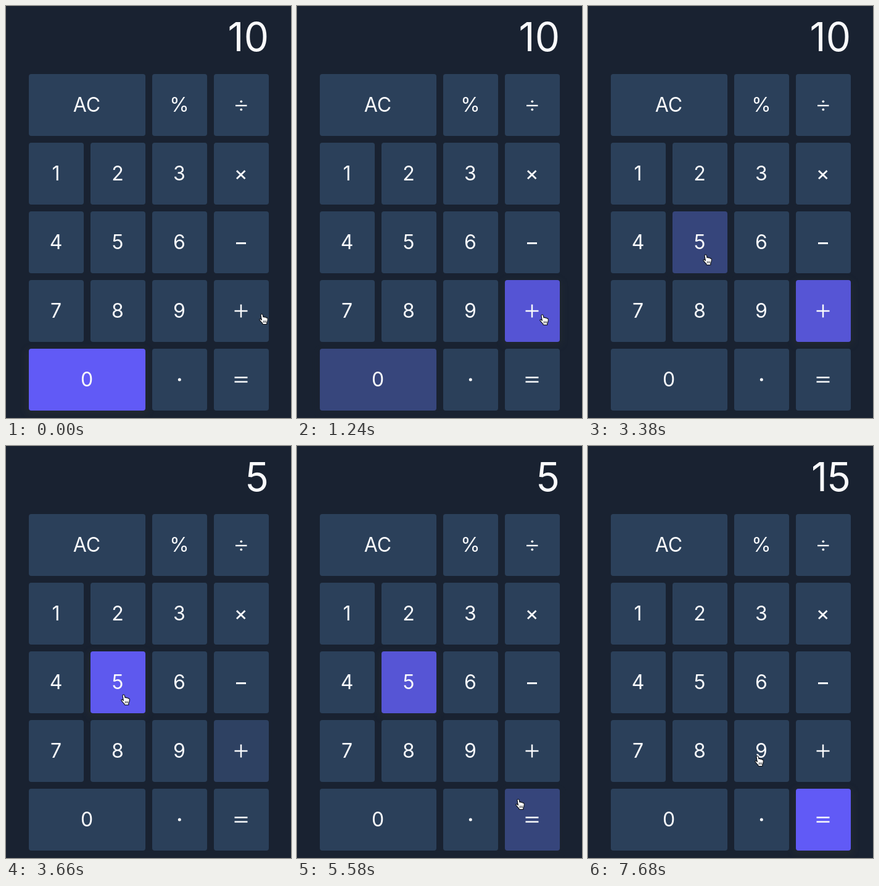
An HTML page for the animation above (8000 ms loop, 462 by 666 pixels).

```html
<!DOCTYPE html>
<html lang="en">
<head>
<meta charset="utf-8">
<title>Calculator</title>
<style>
  html, body { margin: 0; width: 100%; height: 100%; overflow: hidden; background: #192231; }
  svg { display: block; width: 100%; height: 100%; }
  text { font-family: Inter, Roboto, sans-serif; fill: #f9fafc; }
  .label { font-size: 32px; text-anchor: middle; }
  .display { font-size: 64px; text-anchor: end; }
  .sign { fill: none; stroke: #f9fafc; }
</style>
</head>
<body>
<svg viewBox="0 0 462 666">
  <defs><filter id="blur" x="-30%" y="-30%" width="160%" height="160%"><feGaussianBlur stdDeviation="6"/></filter></defs>
  <rect width="462" height="666" fill="#192231"/>
  <text class="display" id="display" x="426" y="73"></text>
  <g id="glows"></g>
  <g id="keys"></g>
  <g id="cursor">
    <path id="arrow" d="M.5 .5V14.8L3.7 11.8L6 17.2L8.2 16.2L6 11H10Z" fill="#080a0e" stroke="#fff" stroke-width="1.1"/>
    <g id="hand" stroke="#0b0e14" stroke-linejoin="round">
      <path d="M-2 1.6C-2-.3.8-.5 1.2 1.3L2 5C2.6 4 4.4 4.2 4.6 5.4C5.4 4.6 7 5 7.1 6.2C8.2 5.6 9.4 6.4 9.3 8C9.3 11 8.6 12.6 7.8 14V16.5H1.2L.9 15C-.5 13.5-2.5 11.5-3.8 9.6C-4.6 8.2-3 7.4-1.8 8.4L-.6 9.6Z" fill="#fff" stroke-width="1.1"/>
      <path d="M2.4 10.5v3.5M4.4 10.5v3.5M6.4 10.5v3.5" stroke-width=".8"/>
    </g>
  </g>
</svg>
<script>
const LOOP = 8000, FADE = 500;
const IDLE = [43, 64, 90], ACTIVE = [97, 90, 246];
const $ = id => document.getElementById(id);

function add(parent, tag, attrs, text = '') {
  const el = document.createElementNS('http://www.w3.org/2000/svg', tag);
  for (const name in attrs) el.setAttribute(name, attrs[name]);
  el.textContent = text;
  parent.append(el);
  return el;
}

// Operator strokes, relative to the key centre: [path, width]
const signs = {
  '÷': ['M-9 1H9.5', 2.4],
  '×': ['M-6.7-5.2L6-.2M-6.7-5.2', 0],
  '−': ['M-8 1.5H8', 3],
  '+': ['M-10.5 0H10.5M0-10.5V10.5', 2.5],
  '=': ['M-10.5-3.5H10.5M-10.5 3.5H10.5', 2.4]
};
signs['×'] = ['M-7-4.7L6.5 8.3M6.5-4.7L-7 8.3', 2.9];
const dots = { '÷': [-5.7, 7.4], '·': [0] };

// Rows of keys; null widens the key before it
const rows = [['AC', null, '%', '÷'], ['1', '2', '3', '×'], ['4', '5', '6', '−'],
  ['7', '8', '9', '+'], ['0', null, '·', '=']];
const keys = [];
rows.forEach((row, r) => row.forEach((name, c) => {
  if (!name) return;
  const x = 37 + 100 * c, y = 110 + 111 * r;
  const w = row[c + 1] === null ? 189 : 89, h = 100;
  const glow = add($('glows'), 'rect', { x: x - 3, y: y + 1, width: w + 6, height: h + 5, rx: 6,
    fill: '#30352f', filter: 'url(#blur)' });
  const box = add($('keys'), 'rect', { x, y, width: w, height: h, rx: 4 });
  const cx = x + w / 2 - .5, cy = y + 50;
  if (signs[name] || dots[name]) {
    const g = add($('keys'), 'g', { transform: `translate(${cx} ${cy})` });
    if (signs[name]) add(g, 'path', { class: 'sign', d: signs[name][0], 'stroke-width': signs[name][1] });
    for (const dy of dots[name] || []) add(g, 'circle', { cx: .3, cy: dy, r: dy ? 1.9 : 2.5, fill: '#f9fafc' });
  } else {
    add($('keys'), 'text', { class: 'label', x: cx, y: y + 61.3 }, name);
  }
  keys.push({ name, x, y, w, h, box, glow });
}));

// Pressed keys and readouts, each with its start time
const presses = [['0', -FADE], ['+', 1000], ['5', 3300], ['=', 5500]];
const readouts = [['10', 0], ['5', 3480], ['15', 5640]];

// Cursor tip: time, x, y
const path = [
  [0, 415, 498], [20, 415, 498], [120, 414, 498.5], [580, 414, 498.5], [840, 398, 499],
  [1800, 398, 499], [2200, 260, 455], [2540, 196, 432.4], [2900, 191, 402], [3700, 191, 402],
  [4000, 260, 480], [4220, 325, 538], [4460, 335, 541], [4800, 375, 574], [5060, 358, 571],
  [5180, 358, 571], [5300, 359, 571], [6580, 359, 571], [7000, 300, 522], [7300, 275, 501], [LOOP, 275, 501]
];

const slope = (i, k) => path[i] && path[i + 1]
  ? (path[i + 1][k] - path[i][k]) / (path[i + 1][0] - path[i][0]) : 0;

function tangent(i, k) {
  const a = slope(i - 1, k), b = slope(i, k);
  return a * b > 0 ? 2 * a * b / (a + b) : 0;
}

// Monotone cubic through the path points
function along(t, k) {
  let i = 0;
  while (i < path.length - 2 && t >= path[i + 1][0]) i++;
  const p = path[i], q = path[i + 1], d = q[0] - p[0], u = (t - p[0]) / d, v = 1 - u;
  return v * v * ((1 + 2 * u) * p[k] + u * d * tangent(i, k))
    + u * u * ((1 + 2 * v) * q[k] - v * d * tangent(i + 1, k));
}

// CSS "ease" curve
function ease(x) {
  if (x <= 0) return 0;
  if (x >= 1) return 1;
  const bez = (a, b, s) => 3 * (1 - s) * s * ((1 - s) * a + s * b) + s ** 3;
  let lo = 0, hi = 1;
  for (let n = 0; n < 20; n++) {
    const mid = (lo + hi) / 2;
    if (bez(.25, .25, mid) < x) lo = mid; else hi = mid;
  }
  return bez(.1, 1, lo);
}

function level(name, t) {
  const i = presses.findIndex(p => p[0] === name);
  if (i < 0) return 0;
  const next = presses[i + 1];
  return ease((t - presses[i][1]) / FADE) - (next ? ease((t - next[1]) / FADE) : 0);
}

function render(t) {
  for (const key of keys) {
    const v = level(key.name, t);
    key.box.setAttribute('fill', `rgb(${IDLE.map((c, i) => Math.round(c + (ACTIVE[i] - c) * v))})`);
    key.glow.setAttribute('opacity', v * .35);
  }
  $('display').textContent = readouts.filter(r => t >= r[1]).pop()[0];
  const x = along(t, 1), y = along(t, 2);
  const over = keys.some(k => x >= k.x && x <= k.x + k.w && y >= k.y && y <= k.y + k.h);
  $('cursor').setAttribute('transform', `translate(${x.toFixed(2)} ${y.toFixed(2)})`);
  $('hand').style.display = over ? '' : 'none';
  $('arrow').style.display = over ? 'none' : '';
}

const start = performance.now();
function tick() {
  render((performance.now() - start) % LOOP);
  requestAnimationFrame(tick);
}
tick();
</script>
</body>
</html>
```
